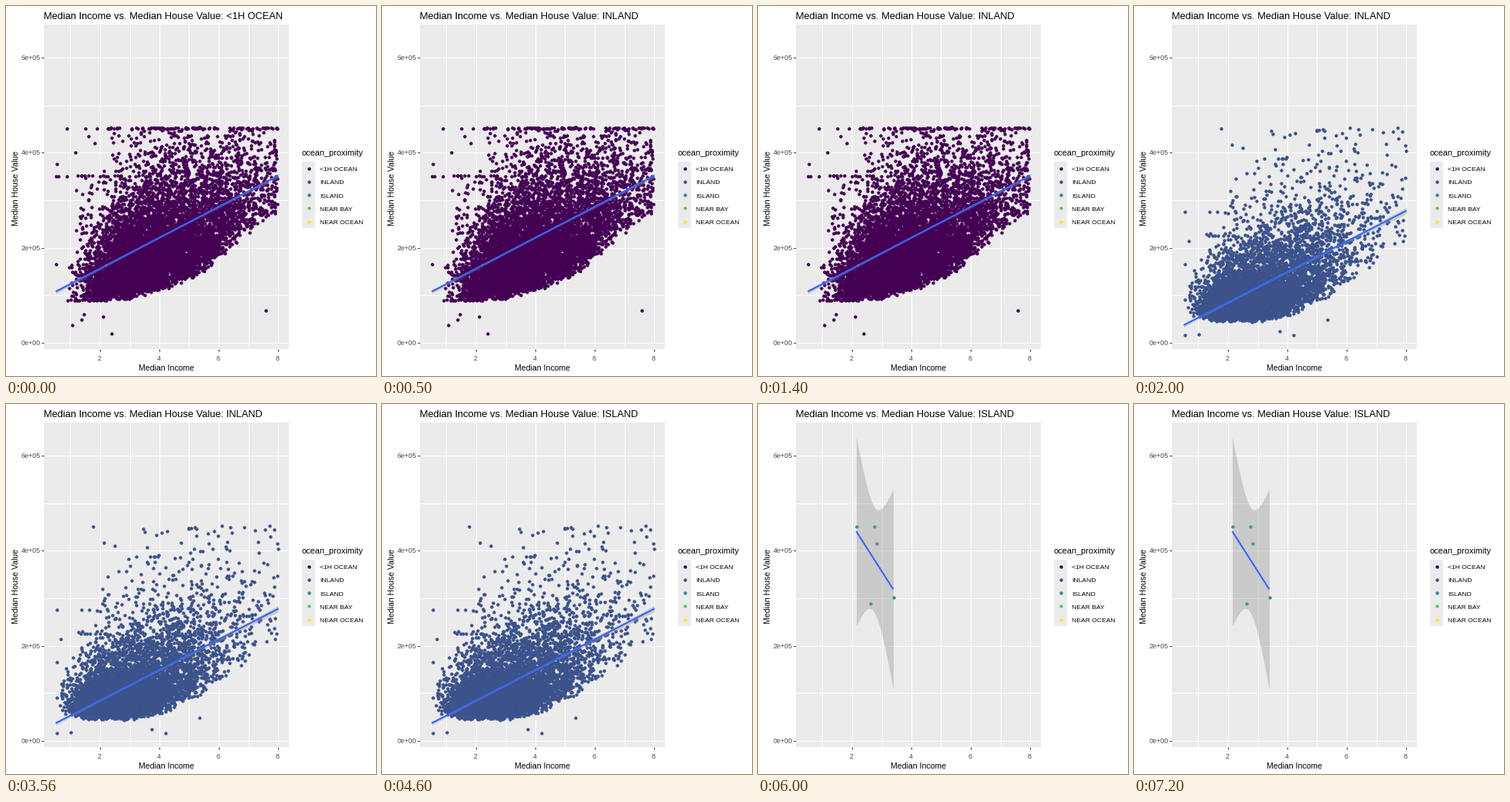
A matplotlib script for the animation above (8000 ms loop, 480 px wide and 480 px high).

```python
import numpy as np
import matplotlib.pyplot as plt
from matplotlib.animation import FuncAnimation
from matplotlib.patches import Rectangle

SIZE, DPI = 480, 80
STEP_MS, LOOP_MS = 100, 8000
PX = 72 / DPI  # one pixel in points

GROUPS = ["<1H OCEAN", "INLAND", "ISLAND", "NEAR BAY", "NEAR OCEAN"]
COLORS = ["#440154", "#3B528B", "#21908C", "#5DC863", "#FDE725"]
TITLE_STARTS = [0, 500, 4600]
DATA_STARTS = [0, 2000, 6000]

LEFT, RIGHT, TOP, BOTTOM = 48.5, 366.5, 23.5, 444.5
CAP_Y = 157

rng = np.random.default_rng(7)
plt.rcParams["font.family"] = "Liberation Sans"

fig = plt.figure(figsize=(SIZE / DPI, SIZE / DPI), dpi=DPI, facecolor="white")
ax = fig.add_axes([0, 0, 1, 1])
ax.set_xlim(-0.5, SIZE - 0.5)
ax.set_ylim(SIZE - 0.5, -0.5)  # integers are pixel centres, y points down
ax.axis("off")


def income_x(income):
    return 44 + 38.5 * income


def value_y(value):
    return 436 - 123.3 * value / 2e5


def label(x, y, text, px, color="black", **kw):
    return ax.text(x, y, text, fontsize=px * PX, color=color,
                   va="baseline", **kw)


def box(x0, y0, x1, y1):
    ax.add_patch(Rectangle((x0, y0), x1 - x0, y1 - y0, fc="#EBEBEB", lw=0, zorder=0))


def rule(xs, ys, color, z=1):
    ax.plot(xs, ys, color=color, lw=PX, solid_capstyle="butt", zorder=z)


def dots(x, y, color):
    return ax.plot(x, y, "o", ms=4.4 * PX, mew=0, color=color, zorder=2)[0]


def cloud(n, shape, scale, knots, edges, spreads):
    """Skewed scatter that rises from a lower edge, in pixels."""
    income = np.maximum(0.4 + rng.gamma(shape, scale, n), 0.5)
    x = income_x(income[income <= 8])
    spread = np.interp(x, knots, spreads) * np.exp(rng.normal(0, 0.33, x.size))
    y = np.interp(x, knots, edges) - spread * rng.gamma(2.5, 1, x.size)
    keep = y > CAP_Y
    return x[keep], y[keep]


def strip(n, x0, x1, y):
    return rng.uniform(x0, x1, n), y + rng.normal(0, 0.4, n)


def join(*parts):
    return [np.concatenate(axis) for axis in zip(*parts)]


def layer(points, color, start, end, band):
    """Points with a straight fit and its confidence ribbon."""
    px = np.asarray(points[0])
    x = np.linspace(start[0], end[0], 80)
    y = np.interp(x, [start[0], end[0]], [start[1], end[1]])
    spread = ((px - px.mean()) ** 2).sum()
    half = band * np.sqrt(1 / px.size + (x - px.mean()) ** 2 / spread)
    ribbon = ax.fill_between(x, y - half, y + half, color="#999999",
                             alpha=0.4, lw=0, zorder=3)
    line = ax.plot(x, y, color="#3366FF", lw=2.1 * PX,
                   solid_capstyle="butt", zorder=4)[0]
    return [dots(*points, color), ribbon, line]


# Panel, grid and axes
box(LEFT, TOP, RIGHT, BOTTOM)
for income in range(1, 9):
    x = round(income_x(income))
    rule([x, x], [TOP, BOTTOM], "white")
    if income % 2 == 0:
        rule([x, x], [BOTTOM, BOTTOM + 3], "#333333")
        label(x, 459.5, str(income), 9, "#4D4D4D", ha="center")
for step in range(7):
    y = round(value_y(step * 1e5))
    rule([LEFT, RIGHT], [y, y], "white")
    if step % 2 == 0:
        rule([LEFT - 3, LEFT], [y, y], "#333333")
        label(44, y + 3.5, f"{step}e+0{5 if step else 0}", 9, "#4D4D4D", ha="right")
label(208, 472.5, "Median Income", 10.5, ha="center")
label(15.5, 235.5, "Median House Value", 10.5, ha="center",
      rotation=90, rotation_mode="anchor")
title = label(48.5, 16.5, "", 12.93)

# Legend
label(383.5, 193.5, "ocean_proximity", 10.9)
box(383.5, 201.5, 400.5, 287.5)
for i, (name, color) in enumerate(zip(GROUPS, COLORS)):
    y = 210 + 17.28 * i
    dots([392], [y], color)
    label(406.5, round(y) + 3.5, name, 8.45)

# Data
KNOTS = [64, 100, 150, 200, 250, 300, 352]

coast = join(
    cloud(8600, 6, 0.63, KNOTS, [382, 384, 382, 371, 351, 309, 268],
          [14, 16, 21, 25, 28, 27, 25]),
    strip(75, 130, 352, 158),
    strip(14, 64, 150, 220),
    strip(22, 76, 130, 381),
    ([78, 102, 117, 89, 65, 64, 64, 85, 97, 100, 125, 136, 336],
     [158, 158, 158, 189, 204, 220, 334, 413, 406, 399, 402, 424, 394]))

inland = join(
    cloud(6300, 4.5, 0.62, KNOTS, [400, 408, 411, 405, 381, 347, 312],
          [8, 10, 15, 21, 25, 28, 30]),
    strip(8, 86, 130, 297),
    strip(8, 64, 110, 363),
    ([112, 126, 160, 168, 183, 201, 236, 239, 246, 246, 279, 290, 308, 341,
      342, 352, 351, 65, 97, 107, 65, 65, 65, 83, 188, 206, 250, 305, 350],
     [158, 179, 209, 197, 206, 166, 161, 160, 161, 170, 157, 159, 159, 157,
      171, 187, 222, 266, 266, 266, 334, 380, 426, 425, 421, 426, 406, 314, 297]))

island = ([127, 145, 150, 153, 175], [158, 258, 158, 180, 250])

layers = [
    layer(coast, COLORS[0], (64, 370), (353, 219.5), 88),
    layer(inland, COLORS[1], (64, 413.5), (353, 265), 82),
    layer(island, COLORS[2], (127, 164.7), (175, 240), 153),
]


def latest(starts, t):
    return sum(t >= start for start in starts) - 1


def draw(frame):
    t = frame * STEP_MS
    title.set_text("Median Income vs. Median House Value: "
                   + GROUPS[latest(TITLE_STARTS, t)])
    current = latest(DATA_STARTS, t)
    for i, artists in enumerate(layers):
        for artist in artists:
            artist.set_visible(i == current)
    return [title]


anim = FuncAnimation(fig, draw, frames=LOOP_MS // STEP_MS, interval=STEP_MS,
                     repeat=True, repeat_delay=0, blit=False)
plt.show()
```
